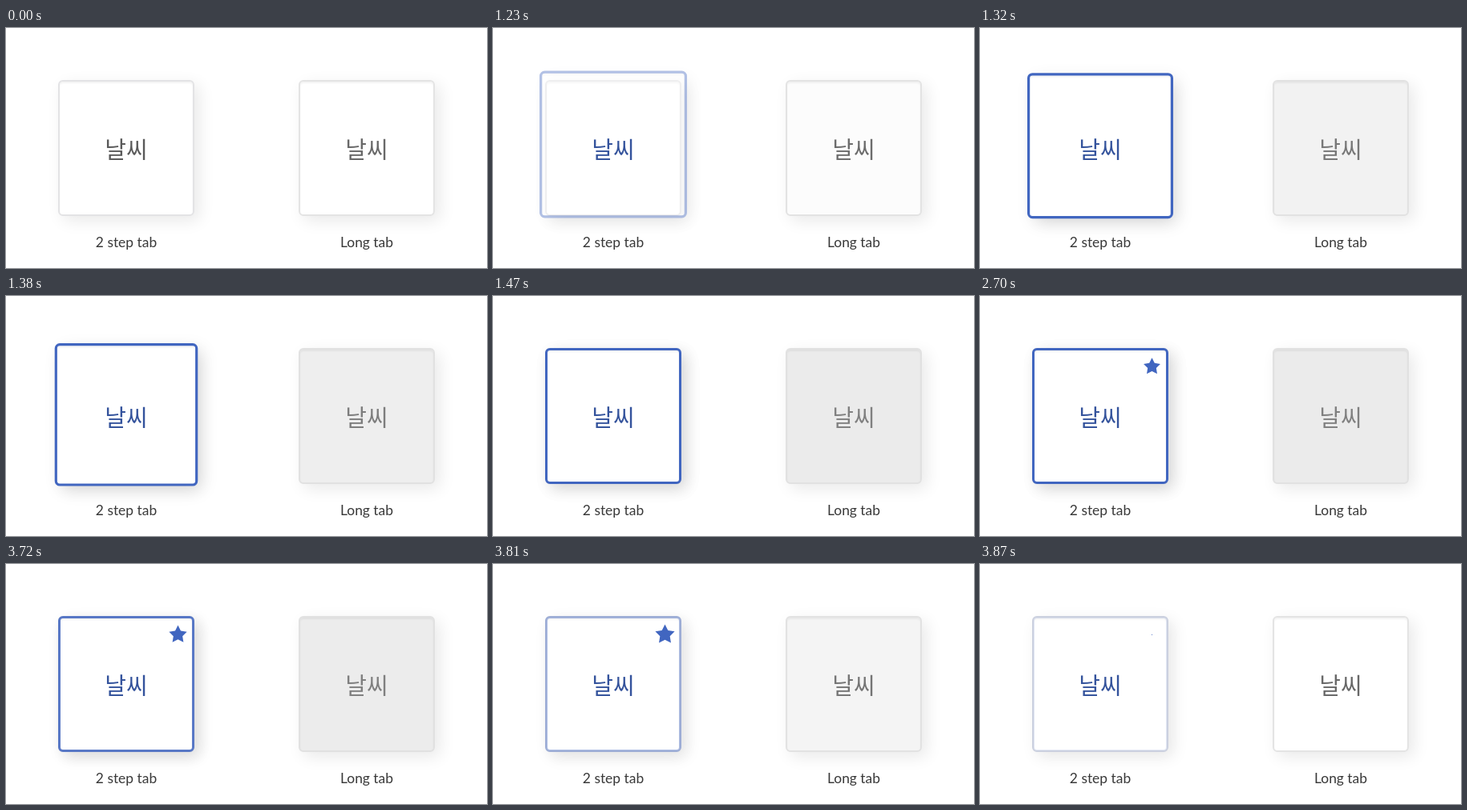
Write an HTML page that moves like this. It is 600 by 300 pixels and loops after 3.9 s.

```html
<!DOCTYPE html>
<html lang="ko">
<head>
<meta charset="utf-8">
<style>
  html, body { margin: 0; width: 100%; height: 100%; overflow: hidden; background: #fff; }
  .tile {
    position: absolute; left: 65px; top: 65px; width: 170px; height: 170px;
    box-sizing: border-box; border: 2.5px solid #e3e3e5; border-radius: 6px; background: #fff;
    box-shadow: 6px 6px 20px rgba(0,0,0,.09), inset 0 2px 2px rgba(0,0,0,.05);
  }
  #long { left: 365px; }
  #ring { border: 3px solid #4166c0; }
  svg { position: absolute; left: 0; top: 0; }
  text { text-anchor: middle; }
  .word { font: 500 29px "Noto Sans CJK KR", "Noto Sans CJK", sans-serif; }
  .label { font: 17.4px Lato, sans-serif; fill: #383838; }
</style>
</head>
<body>
<div class="tile"></div>
<div class="tile" id="ring"></div>
<div class="tile" id="long"></div>
<svg width="600" height="300">
  <text class="word" id="stepWord" x="150" y="163">날씨</text>
  <text class="word" id="longWord" x="450" y="163">날씨</text>
  <text class="label" x="150" y="274">2 step tab</text>
  <text class="label" x="450" y="274">Long tab</text>
  <polygon id="star" fill="#4166c0"/>
</svg>
<script>
const $ = id => document.getElementById(id);
const LOOP = 3900, STEP = 30;
const clamp = v => Math.max(0, Math.min(1, v));
const span = (t, from, length) => clamp((t - from) / length);
const backIn = p => p * p * (4 * p - 3);
const gray = v => `rgb(${v},${v},${v})`;

$('star').setAttribute('points', Array.from({ length: 10 }, (_, i) => {
  const a = i * Math.PI / 5, r = i % 2 ? 5.6 : 11;
  return `${(r * Math.sin(a)).toFixed(2)},${(-r * Math.cos(a)).toFixed(2)}`;
}).join(' '));

function draw(t) {
  const selected = t >= 1230;

  // Blue frame drops onto the tile, later fades out
  const drop = span(t, 1230, 240);
  const scale = 1 + 14 / 170 * (1 - drop * drop);
  const shift = -4.5 * (1 - drop);
  $('ring').style.transform = `translateY(${shift}px) scale(${scale})`;
  $('ring').style.opacity = selected ? span(t, 1200, 75) * (1 - span(t, 3690, 210)) : 0;
  $('stepWord').style.fill = selected ? '#34539c' : '#5a5a5a';

  // Long-press tile darkens, then clears
  const press = selected ? Math.sin(span(t, 1200, 270) * Math.PI / 2) : 0;
  const hold = press * (1 - span(t, 3690, 180) ** 2);
  $('long').style.background = gray(255 - 20 * hold);
  $('long').style.borderColor = gray(228 - 3 * hold);
  $('longWord').style.fill = gray(104 + 24 * hold);

  // Star pops in and out with overshoot
  const grow = t < 2460 ? 0 : 1 - backIn(1 - span(t, 2430, 270));
  const shrink = 1 - backIn(span(t, 3690, 182));
  $('star').setAttribute('transform', `translate(214.5 88.3) scale(${Math.max(0, grow * shrink)})`);
}

let start;
function tick(now) {
  start ??= now;
  draw(Math.floor((now - start) % LOOP / STEP) * STEP);
  requestAnimationFrame(tick);
}
draw(0);
requestAnimationFrame(tick);
</script>
</body>
</html>
```
